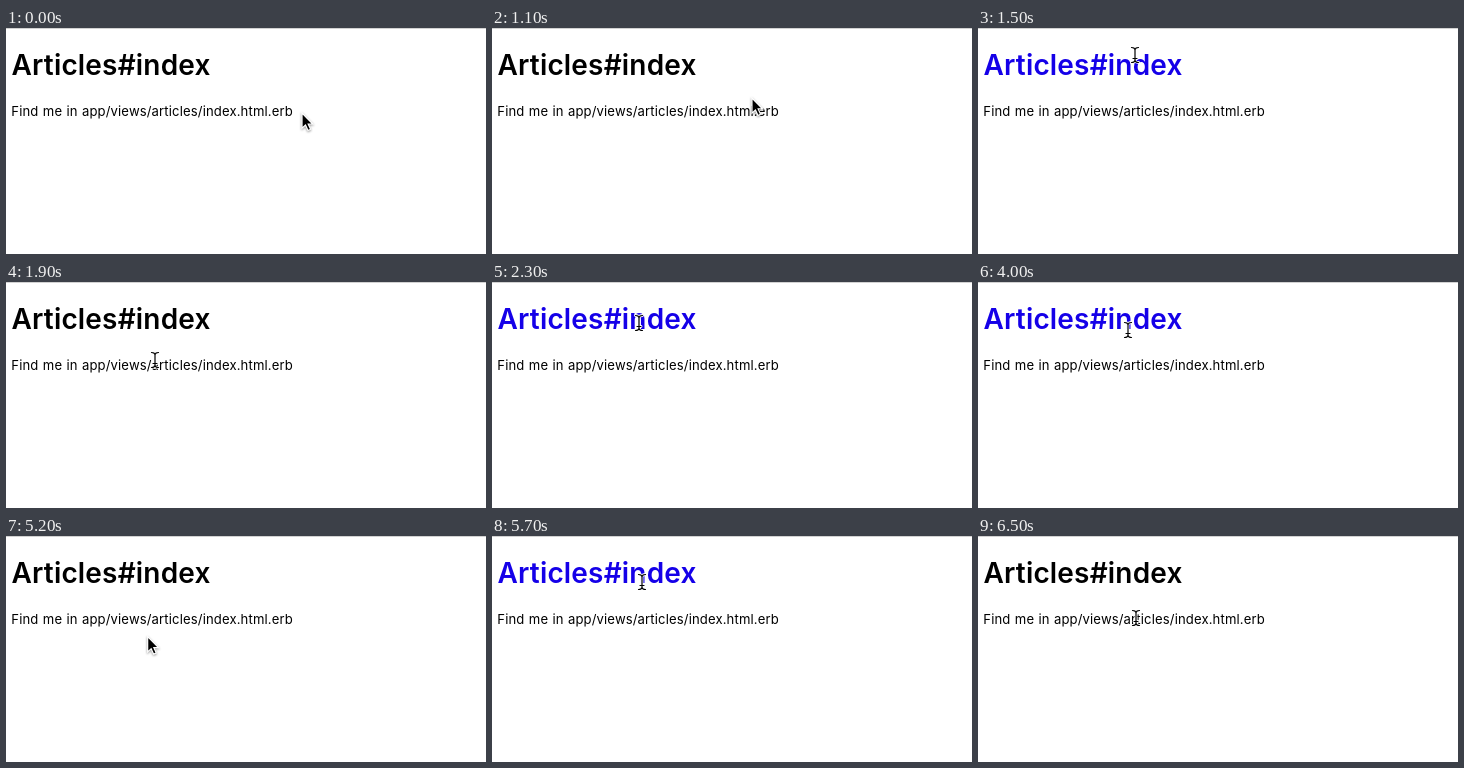
Write an HTML page that moves like this. It is 480 px wide and 226 px high and loops after 7400 ms.

```html
<!DOCTYPE html>
<html lang="en">
<head>
<meta charset="utf-8">
<style>
  html, body { margin: 0; width: 100%; height: 100%; overflow: hidden; background: #fff; }
  svg { display: block; }
  text { font-family: Inter, sans-serif; }
  #title { font-size: 28px; font-weight: 600; letter-spacing: .17px; }
  #note { font-size: 13.1px; letter-spacing: .13px; word-spacing: .5px; }
  #beam path { fill: none; stroke-linecap: round; stroke-linejoin: round; }
  #arrow { filter: drop-shadow(0 1px 1px #0006); }
</style>
</head>
<body>
<svg width="480" height="226" viewBox="0 0 480 226">
  <rect width="480" height="1" fill="#d2d2d2"/>
  <text id="title" x="5.5" y="47">Articles#index</text>
  <text id="note" x="5.3" y="88">Find me in app/views/articles/index.html.erb</text>
  <g id="arrow">
    <path d="M0 0V15.2L3.5 12L6 17.5L8.6 16.3L6.2 11H10.8Z" stroke="#fff" stroke-width="1.2"/>
  </g>
  <g id="beam">
    <path class="shape" stroke="#fff" stroke-width="2.8"/>
    <path class="shape" stroke="#000" stroke-width="1.2"/>
  </g>
</svg>
<script>
const LOOP = 7400, STEP = 100;
const $ = id => document.getElementById(id);
const smooth = u => u * u * (3 - 2 * u);
const clamp = u => Math.min(1, Math.max(0, u));

// The pointer rests between moves
const start = { x: 296, y: 85 };
const moves = [
  { from: 900, to: 1500, x: 157, y: 27 },
  { from: 1500, to: 1700, x: 150, y: 40 },
  { from: 1700, to: 1900, x: 149, y: 78 },
  { from: 2000, to: 2300, x: 147, y: 41 },
  { from: 2700, to: 3000, x: 137, y: 104 },
  { from: 3200, to: 3700, x: 150, y: 48 },
  { from: 4600, to: 4900, x: 141, y: 105 },
  { from: 5100, to: 5700, x: 150, y: 46 },
  { from: 6100, to: 6500, x: 158, y: 82 }
];

for (const shape of document.querySelectorAll(".shape"))
  shape.setAttribute("d", "M-3.5-7.5Q-.5-7.5 0-5.5Q.5-7.5 3.5-7.5M0-5.5V5.5M-3.5 7.5Q-.5 7.5 0 5.5Q.5 7.5 3.5 7.5M-2 3.5H2");

function pointerAt(time) {
  return moves.reduce((p, { from, to, x, y }) => {
    const u = smooth(clamp((time - from) / (to - from)));
    return { x: p.x + (x - p.x) * u, y: p.y + (y - p.y) * u };
  }, start);
}

function draw(now) {
  const time = Math.floor(now % LOOP / STEP) * STEP;
  const { x, y } = pointerAt(time);
  const onTitle = y > 19 && y < 57;
  const onText = onTitle && x < 207 || y > 73 && y < 93 && x < 290;
  $("title").setAttribute("fill", onTitle ? "#1500e8" : "#000");
  for (const [id, shown] of [["beam", onText], ["arrow", !onText]]) {
    $(id).setAttribute("transform", `translate(${x} ${y})`);
    $(id).setAttribute("visibility", shown ? "visible" : "hidden");
  }
  requestAnimationFrame(draw);
}
requestAnimationFrame(draw);
</script>
</body>
</html>
```
